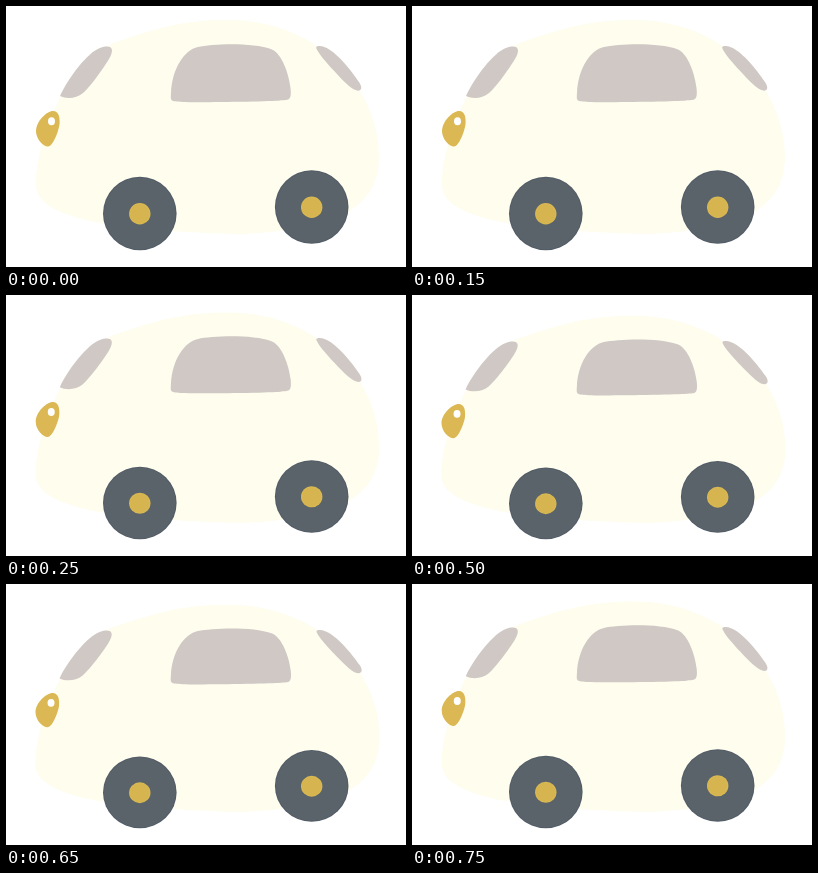
These frames come from a looping animation (400x261 px, 1 s). An HTML page with a canvas:

```html
<!DOCTYPE html>
<html lang="en">
<head>
<meta charset="utf-8">
<title>Bouncing car</title>
<style>
  html, body { margin: 0; width: 100%; height: 100%; overflow: hidden; background: #fff; }
  canvas { display: block; width: 400px; height: 261px; }
</style>
</head>
<body>
<canvas id="stage" width="400" height="261"></canvas>
<script>
const ctx = document.getElementById('stage').getContext('2d');

const STEP = 250, STEPS = 4;
const CREAM = '#fefdee', GLASS = '#d0c8c4', LAMP = '#dbb854';
const TYRE = '#5a636a', TYRE_RIM = '#525c67', HUB = '#d6b550', HUB_RIM = '#dab953';

const hull = new Path2D('M30,178 C30,140 58,55 108,37 S185,14 222,14 ' +
  'C315,14 373,85 373,150 C373,205 325,225 232,228 C160,225.5 28,222 30,178Z');
const rearGlass = new Path2D('M54,90 C62,72 82,46 94,42 S109,43 103,53 S84,81 77,87 S60,93 54,90Z');
const sideGlass = new Path2D('M165,87 C166,63 178,44 192,41 S246,36 266,43.5 ' +
  'C276,48 283,68 284.5,82 S282,93.5 274,94.5 S190,96.7 177,96 S164.5,95 165,87Z');
const frontGlass = new Path2D('M312,40 C326,38 347,67 353,76 S352,88 343,80 S316,52 313,47 S309,41 312,40Z');
const lamp = new Path2D('M30,125 C30,115 41,105 47,105 S54,112 53.5,118 S47,140.5 42,140.5 S30,133 30,125Z');

function fill(path, color) {
  ctx.fillStyle = color;
  ctx.fill(path);
}

function oval(x, y, rx, ry, color) {
  const path = new Path2D();
  path.ellipse(x, y, rx, ry, 0, 0, Math.PI * 2);
  fill(path, color);
}

// Disc with a thin rim of a second colour
function disc(x, y, r, color, rim) {
  oval(x, y, r, r, rim);
  oval(x, y, r - 1, r - 1, color);
}

// Scale around a fixed anchor while drawing
function scaled(x, y, sx, sy, paint) {
  ctx.save();
  ctx.translate(x, y);
  ctx.scale(sx, sy);
  ctx.translate(-x, -y);
  paint();
  ctx.restore();
}

function wheel(x, y, squash) {
  scaled(x, y + 37, 1, 1 - 0.026 * squash, () => {
    disc(x, y, 36.8, TYRE, TYRE_RIM);
    disc(x, y + 0.3, 10.7, HUB, HUB_RIM);
  });
}

function draw(time) {
  // Held steps down and back up: 0, 0.5, 1, 0.5
  const step = Math.floor(time / STEP) % STEPS;
  const squash = 1 - Math.abs(1 - step / 2);

  ctx.fillStyle = '#fff';
  ctx.fillRect(0, 0, 400, 261);
  scaled(200, 228, 1 + 0.003 * squash, 1 - 0.032 * squash, () => {
    fill(hull, CREAM);
    for (const glass of [rearGlass, sideGlass, frontGlass]) fill(glass, GLASS);
    fill(lamp, LAMP);
    oval(45.5, 115.2, 3.5, 4, '#fff');
  });
  wheel(133.8, 207.5, squash);
  wheel(305.7, 201, squash);
}

const start = performance.now();
function tick() {
  draw(performance.now() - start);
  requestAnimationFrame(tick);
}
tick();
</script>
</body>
</html>
```
